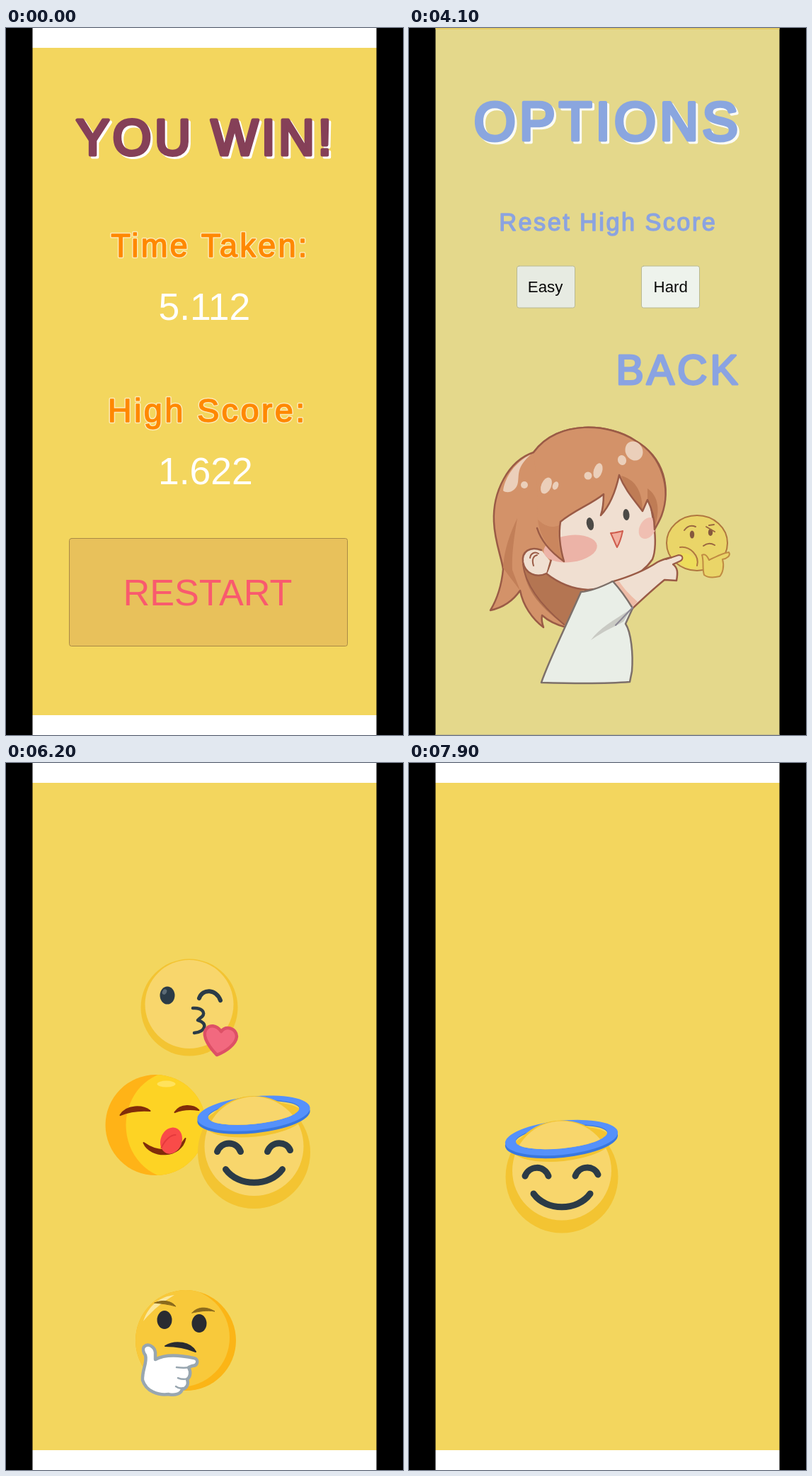
Animation, 561 px wide and 998 px high, one loop 8 s. Source, as an HTML page with a canvas:

```html
<!DOCTYPE html>
<html lang="en">
<head>
<meta charset="utf-8">
<title>Emoji game</title>
<style>
html, body { margin: 0; width: 100%; height: 100%; overflow: hidden; background: #000; }
canvas { display: block; width: 561px; height: 998px; }
</style>
</head>
<body>
<canvas id="stage" width="561" height="998"></canvas>
<script>
const ctx = document.getElementById('stage').getContext('2d');
const LOOP = 8000, OPTIONS_AT = 1500, GAME_AT = 5600, GRAVITY = 950;
const NAVY = '#2b3b47', BROWN = '#9a5b46', SKIN = '#f0dfd1', HAIR = '#d39269';

// ---------- helpers ----------
function paint(d, fill, line, width = 2.5) {
  const p = new Path2D(d);
  if (fill) { ctx.fillStyle = fill; ctx.fill(p); }
  if (line) { ctx.strokeStyle = line; ctx.lineWidth = width; ctx.stroke(p); }
}

function oval(x, y, rx, ry, fill, turn = 0, line, width = 2) {
  ctx.beginPath();
  ctx.ellipse(x, y, rx, ry, turn, 0, Math.PI * 2);
  if (fill) { ctx.fillStyle = fill; ctx.fill(); }
  if (line) { ctx.strokeStyle = line; ctx.lineWidth = width; ctx.stroke(); }
}

const disc = (x, y, r, fill) => oval(x, y, r, r, fill);

// A band across the phone screen
function band(y, h, fill) {
  ctx.fillStyle = fill;
  ctx.fillRect(37.5, y, 486, h);
}

function box(x, y, w, h, fill, line) {
  ctx.beginPath();
  ctx.roundRect(x, y, w, h, 3);
  ctx.fillStyle = fill;
  ctx.fill();
  ctx.strokeStyle = line;
  ctx.lineWidth = 1;
  ctx.stroke();
}

// Text centred on its ink; weight is the extra stroke that thickens it.
function label(text, cx, y, size, color, { weight = 0, shadow, outline } = {}) {
  ctx.font = `${size}px "Liberation Sans", Arial, sans-serif`;
  ctx.letterSpacing = weight ? `${size * 0.07}px` : '0px';
  const m = ctx.measureText(text);
  const x = cx - (m.actualBoundingBoxRight - m.actualBoundingBoxLeft) / 2;
  const put = (shift, tint, width) => {
    ctx.fillStyle = ctx.strokeStyle = tint;
    ctx.lineWidth = width;
    if (width) ctx.strokeText(text, x + shift, y + shift);
    ctx.fillText(text, x + shift, y + shift);
  };
  if (shadow) put(3, shadow, weight);
  if (outline) put(0, outline, weight + 3);
  put(0, color, weight);
}

const clamp = v => Math.max(0, Math.min(1, v));
const ease = v => { v = clamp(v); return v * v * (3 - 2 * v); };
const blend = (a, b, k) => `rgb(${a.map((v, i) => Math.round(v + (b[i] - v) * k))})`;

function yellowRoom() {
  band(0, 28, '#fff');
  band(28, 942, '#f3d65e');
  band(970, 28, '#fff');
}

// ---------- win screen ----------
function winScreen(t) {
  yellowRoom();
  const orange = { weight: 1.4, outline: '#fbe9b4' };
  label('YOU WIN!', 277.5, 178.5, 70, '#854058', { weight: 5, shadow: '#fff' });
  label('Time Taken:', 285.5, 323, 45.4, '#ff8800', orange);
  label('5.112', 280.5, 411.5, 53.5, '#fff');
  label('High Score:', 282.5, 555.5, 47, '#ff8800', orange);
  label('1.622', 283, 643.5, 53.5, '#fff');
  const press = clamp((t - 1150) / 100);
  box(89.5, 720.5, 393, 152, blend([232, 193, 91], [206, 170, 78], press), '#a98a45');
  label('RESTART', 286.5, 815, 52.2, '#f95a6e');
}

// ---------- options screen ----------
function optionsScreen(t) {
  band(0, 998, '#e4d88b');
  band(0, 2, '#e6cb62');
  band(997, 1, '#c9c08a');
  label('OPTIONS', 278.5, 158, 75.8, '#8aa6df', { weight: 5, shadow: '#fbfbf4' });
  label('Reset High Score', 280.5, 286, 34.4, '#8ba3e0', { weight: 1.4 });
  const press = clamp((t - 3950) / 100) * (1 - clamp((t - 4250) / 100));
  box(152.5, 336, 82, 59, blend([238, 243, 236], [231, 235, 226], press), '#b9b993');
  box(328.5, 336, 82, 59, '#eef3ec', '#b9b993');
  label('Easy', 193.5, 373, 22.3, '#080808');
  label('Hard', 369.5, 373, 22.3, '#080808');
  label('BACK', 380.5, 502.5, 58.8, '#8aa3e2', { weight: 3 });
  girl();
}

function girl() {
  // back hair
  paint('M176 599C140 611 118 655 120 697C121 725 131 748 133 764C131 785 124 807 115 822C134 818 148 807 157 794C161 815 174 834 190 846C188 840 187 834 188 829C198 838 210 843 222 846L262 770L354 690C372 650 361 606 319 582C285 559 211 551 176 599Z', HAIR, BROWN);
  paint('M161 757C164 790 179 813 221 844L247 795L192 768Z', '#b47552');
  paint('M133 762C134 737 143 713 153 692C148 722 145 743 146 765L157 794C152 787 142 775 133 762Z', '#c27f58');
  // face and ear
  paint('M214 686C208 714 205 746 194 770C213 785 231 792 253 793C291 791 327 775 344 750C350 735 348 715 346 700L336 640L285 625Z', SKIN, BROWN);
  paint('M194 770C180 777 164 770 161 754C159 739 171 731 187 737L199 752Z', SKIN);
  paint('M194 770C180 777 164 770 161 754C159 739 171 731 187 737', null, BROWN);
  paint('M171 748C172 741 178 739 183 742M176 759C173 750 176 745 181 744', null, BROWN, 2);
  oval(228, 735, 38, 19, '#ecb3a7', -0.12);
  oval(337, 706, 11, 16, '#f0bfb2', 0.5);
  oval(256, 700, 5, 9, '#4c4a46', -0.2);
  oval(307, 687, 4.5, 8, '#4c4a46', -0.1);
  paint('M285 713C291 713 297 711 302 710C300 719 297 728 294 733C291 727 288 719 285 713Z', '#f2b0a0', '#cf5d4e', 2);
  // bangs
  const bangs = 'M176 599C211 551 285 559 319 582C358 604 371 650 357 688C354 696 350 702 347 708C347 694 344 680 337 666L330 682C320 668 306 654 297 631C292 654 285 673 271 688C274 679 275 668 275 658C258 672 233 681 214 697C211 715 214 736 219 753C199 739 186 722 181 706';
  paint(bangs + 'L182 655Z', HAIR);
  paint('M300 632C317 637 330 650 330 682C320 668 306 654 300 632ZM337 650C353 661 355 681 347 706C347 690 344 676 337 666Z', '#bf7c55');
  paint('M182 694C184 716 199 739 219 753C211 737 209 719 212 702C200 707 191 702 182 694Z', '#ca865e');
  paint(bangs, null, BROWN);
  paint('M161 757C164 783 182 811 219 842', null, BROWN, 2);
  const shine = '#ebcfba';
  paint('M172 602C150 613 136 633 133 653C138 658 152 655 154 641C156 628 152 621 172 602Z', shine);
  disc(163, 645, 5, shine);
  oval(194, 646, 7, 12, shine, 0.4);
  oval(207, 646, 4, 6, shine, 0.4);
  disc(253, 632, 5.5, shine);
  oval(267, 625, 6, 11, shine, 0.3);
  oval(318, 597, 12, 14, shine, -0.5);
  oval(301, 610, 6, 7, shine, -0.3);
  // pointing arm
  paint('M286 782C310 775 336 764 351 754C362 748 374 747 382 744C388 745 387 751 381 753L373 757C380 762 380 769 378 780L361 779C345 792 331 805 314 821Z', SKIN, BROWN);
  paint('M289 783L314 819L323 810C312 800 303 791 297 781Z', '#eebba6');
  // shirt
  paint('M243 796C258 795 276 787 288 781C299 793 308 806 316 819L306 841C314 853 317 884 315 908L312 923C275 926 224 925 187 924C196 897 218 852 243 796Z', '#e9eee7', '#7d706a');
  paint('M257 864C268 848 289 836 314 820L303 838C293 844 281 848 257 864Z', '#c9cac4');
  paint('M316 818L292 843', null, '#8b8794', 2);
  thinkerSketch();
}

function thinkerSketch() {
  const line = '#b0773f';
  oval(407, 727, 43, 39, '#ead568', 0, line);
  oval(394, 752, 15, 9, '#eedd5a', 0.5);
  paint('M383 733C397 731 411 745 407 759', null, line, 2);
  oval(400, 715, 3.2, 5.5, '#86593e');
  oval(426, 712, 3.2, 5, '#86593e');
  paint('M389 709C394 702 400 702 405 704M420 704L432 711M424 702L431 701M416 731C421 727 427 727 432 730', null, '#9a6640', 2);
  paint('M414 744C420 741 423 749 424 751C434 746 444 741 452 740C455 745 449 749 443 750C446 760 443 770 439 774C431 776 422 776 417 772C414 762 417 752 414 744Z', '#ead568', '#c08b42', 2);
  // fingertip in front of the cheek
  paint('M363 752L381 744C387 744 389 750 382 753L371 758Z', SKIN);
  paint('M363 750L381 744C387 744 389 750 382 753L373 757', null, BROWN, 2);
}

// ---------- emoji, each drawn around its centre ----------
function kiss() {
  disc(0, 0, 68.5, '#f3c432');
  disc(0, -4.5, 62.5, '#f8d66c');
  oval(-31, -17, 10.5, 12.5, NAVY);
  oval(-35, -22, 3, 4, '#5c6b76', 0.5);
  paint('M14 -13C19 -27 38 -26 44 -10', null, NAVY, 6);
  paint('M5 1C17 0 24 7 18 13Q13 17 12 18C27 22 23 34 7 36', null, NAVY, 4.5);
  paint('M39 67C29 57 18 41 23 32C28 23 39 25 45 34C52 25 66 29 67 41C66 52 52 62 39 67Z', '#f2697f', '#dd5066', 4.5);
}

function yum() {
  disc(0, 0, 71, '#ffb317');
  ctx.save();
  ctx.beginPath();
  ctx.arc(0, 0, 71, 0, 7);
  ctx.clip();
  oval(28, 0, 70, 76, '#fdd324');
  oval(15, -58, 13, 4.5, '#ffe25c');
  ctx.restore();
  const brow = '#812d0a';
  paint('M-50 -14C-41 -29 -18 -28 -8 -20C-22 -21 -38 -19 -50 -14ZM27 -18C35 -30 53 -29 61 -21C48 -23 37 -22 27 -18Z', brow, brow, 2);
  paint('M-17 25C-7 48 36 47 42 19C32 36 7 42 -17 25Z', brow, brow, 2);
  oval(22, 22, 15, 19, '#f94b49', 0.35);
  paint('M8 32C13 21 21 14 28 14', null, '#e5393c', 2);
}

function halo() {
  const tilt = -0.1;
  const head = () => {
    disc(0, 0, 79.5, '#f3c432');
    disc(0, -8.5, 70, '#f8d66c');
  };
  const ring = (dy, color) => {
    ctx.beginPath();
    ctx.ellipse(-0.5, -54 + dy, 80, 24, tilt, 0, 7);
    ctx.ellipse(-0.5, -56 + dy * 0.3, 65, 16, tilt, 0, 7);
    ctx.fillStyle = color;
    ctx.fill('evenodd');
  };
  head();
  oval(0, -46, 71, 24, '#f3c432', tilt);
  ring(3, '#3877df');
  ring(-1, '#5591fb');
  // the crown rises through the ring and covers its back
  ctx.save();
  ctx.translate(-0.5, -56);
  ctx.rotate(tilt);
  ctx.beginPath();
  ctx.rect(-63, -60, 126, 60);
  ctx.ellipse(0, 0, 65, 16, 0, 0, Math.PI);
  ctx.clip();
  ctx.rotate(-tilt);
  ctx.translate(0.5, 56);
  head();
  ctx.restore();
  paint('M-52 -1C-46 -16 -25 -17 -19 -1M19 -1C25 -17 46 -16 51 -3', null, NAVY, 9);
  paint('M-40 24C-22 49 22 49 40 24', null, NAVY, 9);
}

function think() {
  disc(0, 0, 71, '#fbb516');
  ctx.save();
  ctx.beginPath();
  ctx.arc(0, 0, 71, 0, 7);
  ctx.clip();
  oval(-9, -4, 71, 70, '#f8c93b');
  ctx.restore();
  paint('M-60 -27C-52 -51 -35 -62 -16 -64C-31 -55 -45 -45 -60 -27Z', '#fbe79d');
  paint('M-44 -53C-33 -58 -20 -56 -14 -48C-24 -51 -34 -52 -44 -53ZM9 -39C18 -49 31 -47 41 -41C29 -43 20 -41 9 -39Z', '#8b6a1c', '#8b6a1c', 1);
  oval(-30, -29, 10.5, 13, '#292b31');
  oval(19, -24, 10.5, 13, '#292b31');
  paint('M-29 8C-14 -1 7 3 14 16C0 10 -12 8 -29 8Z', '#292b31', '#292b31', 2);
  paint('M-59 9C-53 3 -44 9 -43 17L-43 27C-31 20 -11 20 12 25C19 27 17 36 9 36L4 38C8 45 6 52 2 55C5 63 0 68 -5 69C-7 76 -16 78 -24 76C-39 78 -56 72 -61 56C-62 42 -54 31 -57 21C-60 17 -61 12 -59 9Z', '#fff', '#98a6b0', 4.5);
  paint('M-13 38C-5 39 0 39 5 38M-11 53C-6 55 -1 55 2 54M-14 65C-10 68 -7 68 -4 67', null, '#98a6b0', 2.5);
}

// ---------- game ----------
function show(draw, x, y) {
  ctx.save();
  ctx.translate(x, y);
  draw();
  ctx.restore();
}

function gameScreen(t) {
  yellowRoom();
  // all are dropped from rest and stop at their floor
  const age = Math.max(0, t - 5637) / 1000;
  const fall = (from, floor) => Math.min(from - 2 + GRAVITY * age * age / 2, floor);
  const nudge = ease((t - 5700) / 400);
  const wedge = ease((t - 6720) / 450);

  if (t < 6300) show(think, 254, fall(666, 871));
  if (t < 7500) show(yum, 208.5 + 3 * nudge - 11 * wedge, fall(362, 872));
  if (t < 7250) {
    show(halo, 342.5 + 8 * nudge + 45 * wedge, fall(400.5, 861));
  } else {
    const s = (t - 7250) / 1000;
    show(halo, 216, 93 + 445 * s + GRAVITY * s * s / 2);
  }
  if (t < 7200) show(kiss, 259 + 26 * wedge, fall(196, 734.5) + 22 * wedge);
}

function frame(now) {
  const t = now % LOOP;
  ctx.fillStyle = '#000';
  ctx.fillRect(0, 0, 561, 998);
  ctx.lineCap = ctx.lineJoin = 'round';
  if (t < OPTIONS_AT) winScreen(t);
  else if (t < GAME_AT) optionsScreen(t);
  else gameScreen(t);
  requestAnimationFrame(frame);
}

frame(0);
</script>
</body>
</html>
```
